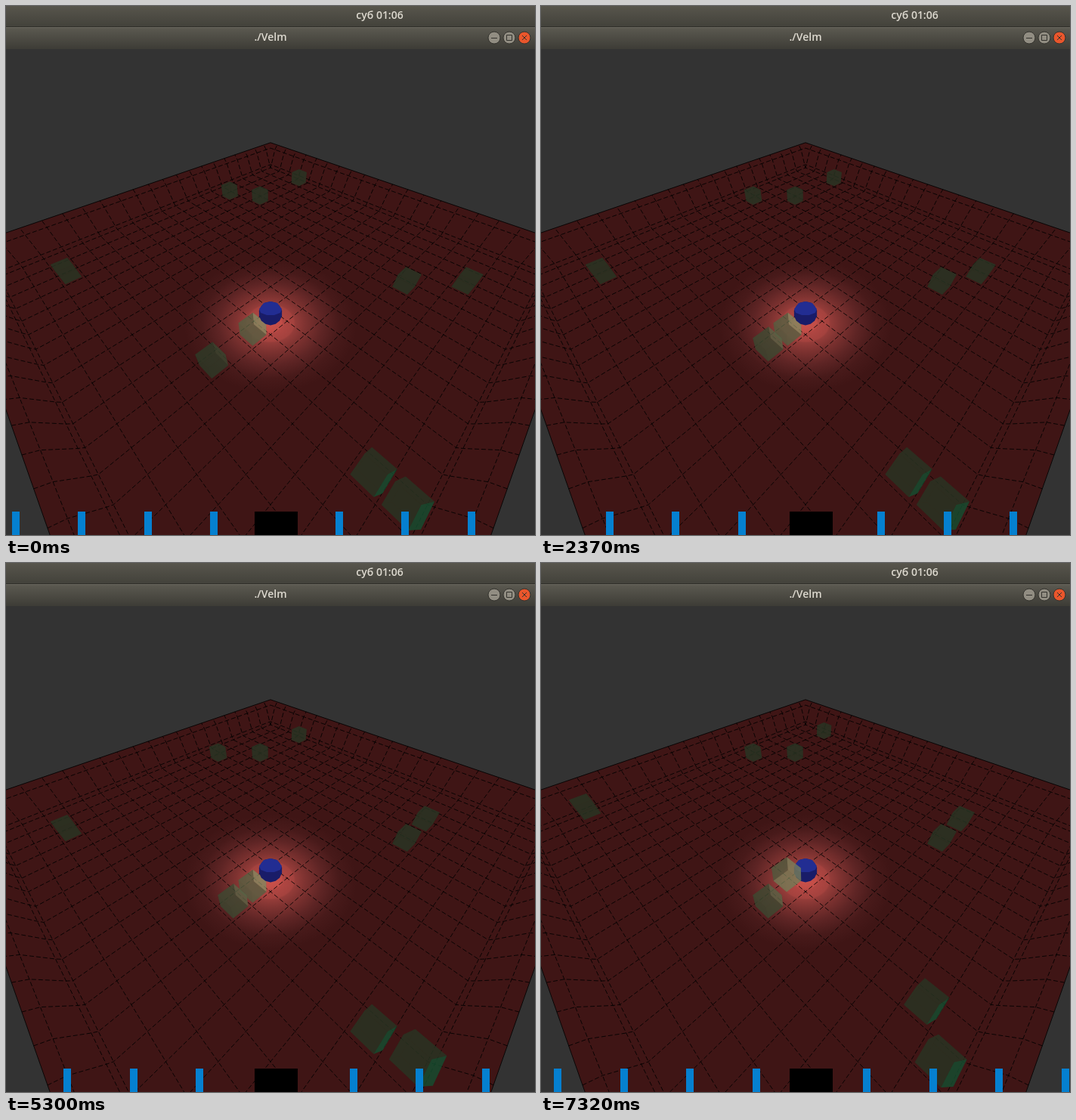
Recreate the animation shown at these times as an HTML page with a canvas. Size 700 by 700 pixels, loop 8000 ms.

```html
<!DOCTYPE html>
<html lang="ru">
<head>
<meta charset="utf-8">
<style>
html, body { margin: 0; width: 100%; height: 100%; overflow: hidden; background: #333; }
canvas { display: block; }
.text { position: absolute; font: 600 14px/20px "Open Sans", "Noto Sans", sans-serif; color: #dedad0; transform: translateX(-50%); white-space: nowrap; }
</style>
</head>
<body>
<canvas id="stage" width="700" height="700"></canvas>
<div class="text" style="left:494.5px;top:2px">суб 01:06</div>
<div class="text" style="left:350px;top:31px">./Velm</div>
<script>
const c = document.getElementById('stage').getContext('2d');
const LOOP = 8000, HALF_BEAT = 7.135, HOP_TIME = 5.3, BAR_GAP = 87.5, BAR_STEP = 6.13;

// Screen updates come at an uneven pace: [ms, update count].
const PACE = [[0, 0], [50, 1], [810, 12], [880, 13], [1480, 19], [1620, 20], [2370, 27], [2480, 28],
  [3250, 35], [3350, 36], [4130, 43], [4250, 44], [4980, 51], [5090, 52], [5840, 59], [5950, 60],
  [6690, 67], [6790, 68], [7320, 73]];

// Cells along the right-back and left-back axes; the player stands at 0,0.
const CUBES = { A: [6, -3], B: [8, -5], C: [-1, 0], D: [6, 10], E: [-3, 0],
  F: [-2, -7], G: [7, 8], H: [-2, -6], L: [-5, 9], M: [11, 8] };
// [half beat, cube, change along each axis]
const MOVES = [[1, 'B', 0, 1, 0], [3, 'D', -1, 0, 0], [3, 'E', 1, 0, 0], [5, 'B', 0, 1, 0],
  [8, 'L', 0, 1, 0], [8, 'H', 1, 0, 0], [10, 'M', 0, 1, 0], [10, 'F', 0, 0, -.14]];
const HOPS = ['', 'G', 'AC', '', 'F', 'F', 'F', 'F', 'CGF', 'F', 'CL'];

const TILT = 49.5 * Math.PI / 180, SIN = Math.sin(TILT), COS = Math.cos(TILT);

// Floor edges, and the wall around it as [outset, height] from rim to floor
const LOW = -7.5, HIGH = 11.5;
const WALL = [[.75, 1], [.5, .72], [.1, -.3], [0, -.5]];

function project(a, b, z) {
  const u = (a - b) / Math.SQRT2, v = (a + b) / Math.SQRT2;
  const depth = 10.9 + v * COS - z * SIN, k = 350 / depth;
  return [350 + u * k, 407 - (v * SIN + z * COS) * k, depth];
}

function trace(points, close) {
  c.beginPath();
  points.forEach(p => c.lineTo(p[0], p[1]));
  if (close) c.closePath();
}

function fill(points, color) {
  trace(points, true);
  c.fillStyle = color;
  c.fill();
}

function rect(x, y, w, h, color) {
  c.fillStyle = color;
  c.fillRect(x, y, w, h);
}

function ring([outset, z]) {
  const l = LOW - outset, h = HIGH + outset;
  return [[l, l], [l, h], [h, h], [h, l]].map(([a, b]) => project(a, b, z));
}

function drawGlow() {
  c.save();
  c.translate(350, 422);
  c.scale(1, .78);
  const glow = c.createRadialGradient(0, -4, 0, 0, 0, 114);
  [[0, '#cc524b'], [.13, '#c24d47'], [.15, '#b04642'], [.27, '#a4423e'], [.29, '#943c39'],
    [.4, '#7f3331'], [.6, '#5f2525'], [.8, '#481a1a'], [1, '#3f1515']].forEach(s => glow.addColorStop(...s));
  c.fillStyle = glow;
  c.beginPath();
  c.arc(0, 0, 114, 0, 7);
  c.fill();
  c.restore();
}

function drawFloor() {
  const rim = ring(WALL[0]);
  fill(rim, '#3f1515');
  drawGlow();

  c.lineWidth = 1;
  c.strokeStyle = 'rgba(0,0,0,.85)';
  c.setLineDash([6, 3]);
  const path = WALL.map(([s, z]) => [LOW - s, z]).concat(
    WALL.map(([s, z]) => [HIGH + s, z]).reverse());
  for (let i = LOW; i <= HIGH; i++) {
    trace(path.map(([t, z]) => project(i, t, z)));
    c.stroke();
    trace(path.map(([t, z]) => project(t, i, z)));
    c.stroke();
  }
  WALL.slice(1, 3).forEach(w => { trace(ring(w), true); c.stroke(); });
  c.setLineDash([]);
  trace(rim, true);
  c.stroke();
}

function drawCube({ pos }) {
  const r = .38, faces = [];
  for (let axis = 0; axis < 3; axis++) for (const side of [-r, r]) {
    const mid = pos.slice();
    mid[axis] += side;
    const corners = [[-r, -r], [r, -r], [r, r], [-r, r]].map(([p, q]) => {
      const m = mid.slice();
      m[(axis + 1) % 3] += p;
      m[(axis + 2) % 3] += q;
      return project(...m);
    });
    const facing = side * mid[axis] < 0 ? 1.5 : .75;
    const glow = facing * Math.exp(-(mid[0] ** 2 + mid[1] ** 2 + mid[2] ** 2) / 4);
    const green = axis == 1 && side < 0 && pos[1] < -5.4;
    const base = green ? [12, 92, 56] : [40, 54, 36];
    const rgb = base.map((v, i) => v + [80, 74, 54][i] * glow);
    faces.push({ corners, depth: project(...mid)[2], color: `rgba(${rgb},.55)` });
  }
  // The far faces shine through the near ones.
  faces.sort((p, q) => p.depth - q.depth).forEach(f => fill(f.corners, f.color));
}

function drawPlayer() {
  const body = Array.from({ length: 14 }, (_, i) => {
    const t = i * Math.PI / 7;
    return [350 + 15.5 * Math.sin(t), 406.7 - 15.7 * Math.cos(t)];
  });
  fill(body, '#191c68');
  fill([[335, 401], [341, 393], [350, 391], [359, 393], [365, 401], [363, 406], [355, 409],
    [345, 409], [337, 406]], '#222d92');
}

function drawCubes(n) {
  const beat = Math.floor(n / HALF_BEAT);
  const x = (n - beat * HALF_BEAT) / HOP_TIME;
  const height = x < 1 ? 3.36 * x * (1 - x) : 0;
  const list = Object.entries(CUBES).map(([name, cell]) => {
    const pos = [...cell, -.12];
    MOVES.forEach(([at, who, ...step]) => {
      if (who == name && at <= beat) step.forEach((d, i) => pos[i] += d);
    });
    const hop = HOPS[beat].includes(name) ? height : 0;
    pos[2] += hop;
    return { pos, hop, depth: project(...pos)[2] };
  }).sort((p, q) => q.depth - p.depth);
  const over = o => o.hop > 0 && o.depth < 10.9;
  list.filter(o => !over(o)).forEach(drawCube);
  drawPlayer();
  list.filter(over).forEach(drawCube);
}

function drawBars(n) {
  for (let pos = (270 + BAR_STEP * n) % BAR_GAP; pos < 350; pos += BAR_GAP) {
    const x = Math.round(pos);
    if (x >= 2) rect(x, 669, 10, 31, '#0580d0');
    if (x >= 10) rect(706 - x, 669, 10, 31, '#0580d0');
  }
  rect(329, 669, 57, 31, '#000');
}

function drawWindow() {
  const band = (y, h, top, bottom) => {
    const g = c.createLinearGradient(0, y, 0, y + h);
    g.addColorStop(0, top);
    g.addColorStop(1, bottom);
    rect(0, y, 700, h, g);
  };
  band(0, 27, '#57554c', '#43423b');
  rect(0, 27, 700, 1, '#302f2a');
  band(28, 29, '#5c5a51', '#3d3c36');
  rect(0, 28, 700, 1, '#6a685f');
  [646, 666, 686].forEach((x, i) => {
    c.beginPath();
    c.arc(x, 42, 8, 0, 7);
    c.fillStyle = i == 2 ? '#e9562c' : '#918d82';
    c.fill();
    c.strokeStyle = '#33322d';
    c.lineWidth = 1;
    c.stroke();
    c.beginPath();
    if (i == 0) { c.moveTo(642, 42.5); c.lineTo(650, 42.5); }
    if (i == 1) c.rect(662.5, 38.5, 7, 7);
    if (i == 2) { c.moveTo(683, 39); c.lineTo(689, 45); c.moveTo(689, 39); c.lineTo(683, 45); }
    c.stroke();
  });
}

function updateCount(t) {
  const i = PACE.findIndex(p => p[0] > t);
  if (i < 0) return 73;
  const [t0, n0] = PACE[i - 1], [t1, n1] = PACE[i];
  return Math.floor(n0 + (n1 - n0) * (t - t0) / (t1 - t0) + .15);
}

function draw() {
  const n = updateCount(performance.now() % LOOP);
  rect(0, 0, 700, 700, '#333');
  drawFloor();
  drawCubes(n);
  drawBars(n);
  drawWindow();
  requestAnimationFrame(draw);
}
draw();
</script>
</body>
</html>
```
